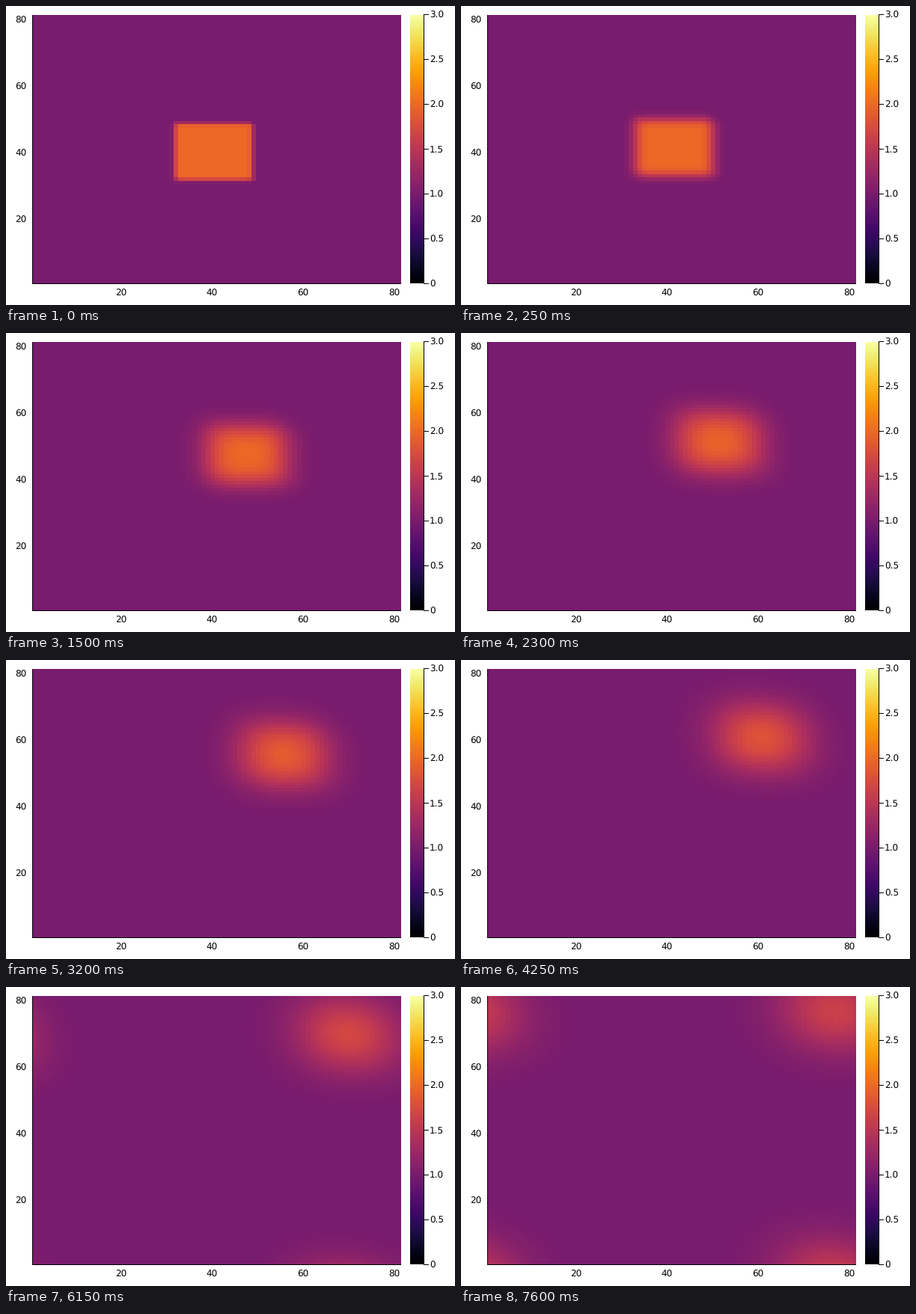
Animation of 600x400 px, one loop 8000 ms. Source, as a matplotlib script:

```python
import numpy as np
import matplotlib.pyplot as plt
from matplotlib.animation import FuncAnimation

W, H, DPI = 600, 400, 100
PX = 72 / DPI                 # points per pixel
N = 81                        # grid cells per side
FRAMES, STEP_MS = 160, 50
C, NU = 0.24, 0.06            # Courant number, diffusion number
LEFT, RIGHT, TOP, BOTTOM = 35, 528, 12, 372
WIDE, TALL = RIGHT - LEFT, BOTTOM - TOP

plt.rcParams["font.family"] = "DejaVu Sans"
plt.rcParams["text.hinting"] = "none"


def advance(u):
    """One explicit upwind convection-diffusion step on a periodic grid."""
    west, south = np.roll(u, 1, 1), np.roll(u, 1, 0)
    east, north = np.roll(u, -1, 1), np.roll(u, -1, 0)
    return (u - C * (2 * u - west - south)
            + NU * (west + east + south + north - 4 * u))


def solve():
    u = np.ones((N, N))
    u[31:48, 31:48] = 2
    states = []
    for _ in range(FRAMES):
        u = advance(u)
        states.append(u)
    return states


# Grid cell shown by each pixel column and row (rows counted from the bottom).
cols = np.arange(WIDE) * N // WIDE
rows = np.maximum(np.arange(TALL) * N - 1, 0) // TALL


def pixels(u):
    return u[np.ix_(rows, cols)]


# The picture is refreshed less often as the pulse smooths out.
refresh = np.array([0, *range(50, 1051, 100), 1200, 1350,
                    *range(1500, 2501, 200), 2700,
                    *range(2950, 3951, 250), *range(4250, 5451, 300),
                    *range(5800, 6851, 350), 7250, 7600])
states = solve()

fig = plt.figure(figsize=(W / DPI, H / DPI), dpi=DPI, facecolor="white")
ax = fig.add_axes([0, 0, 1, 1])
ax.axis("off")


def line(x, y):
    ax.plot(x, y, color="black", lw=PX, solid_capstyle="butt",
            snap=False, zorder=3)


def label(x, y, text, ha):
    """Text whose digits are centred on height y."""
    ax.text(x, y + 4.4, text, ha=ha, va="baseline", fontsize=12 * PX)


shade = dict(cmap="inferno", vmin=0, vmax=3, aspect="auto",
             interpolation="nearest", origin="lower")
field = ax.imshow(pixels(states[0]), extent=(LEFT, RIGHT, BOTTOM, TOP), **shade)
ax.imshow(np.linspace(0, 3, 256)[:, None],
          extent=(540, 558, BOTTOM - 1, TOP), **shade)

line([LEFT + 0.5] * 2, [TOP, BOTTOM])
line([LEFT, RIGHT], [BOTTOM - 0.5] * 2)
line([558.5] * 2, [TOP, BOTTOM])

for v in range(20, 81, 20):
    part = (v - 0.5) / N
    label(LEFT + part * WIDE, 383.2, str(v), "center")
    label(27.5, BOTTOM - 0.3 - part * TALL, str(v), "right")

for k in range(7):
    y = 371.5 - k * 359.7 / 6
    line([558, 565], [np.floor(y) + 0.5] * 2)
    label(566, y, f"{k / 2:.1f}" if k else "0", "left")

ax.set_xlim(0, W)
ax.set_ylim(H, 0)


def update(i):
    shown = refresh[refresh <= i * STEP_MS].max() // STEP_MS
    field.set_data(pixels(states[shown]))
    return [field]


anim = FuncAnimation(fig, update, frames=FRAMES, interval=STEP_MS,
                     repeat=True, repeat_delay=0, blit=False)
plt.show()
```
